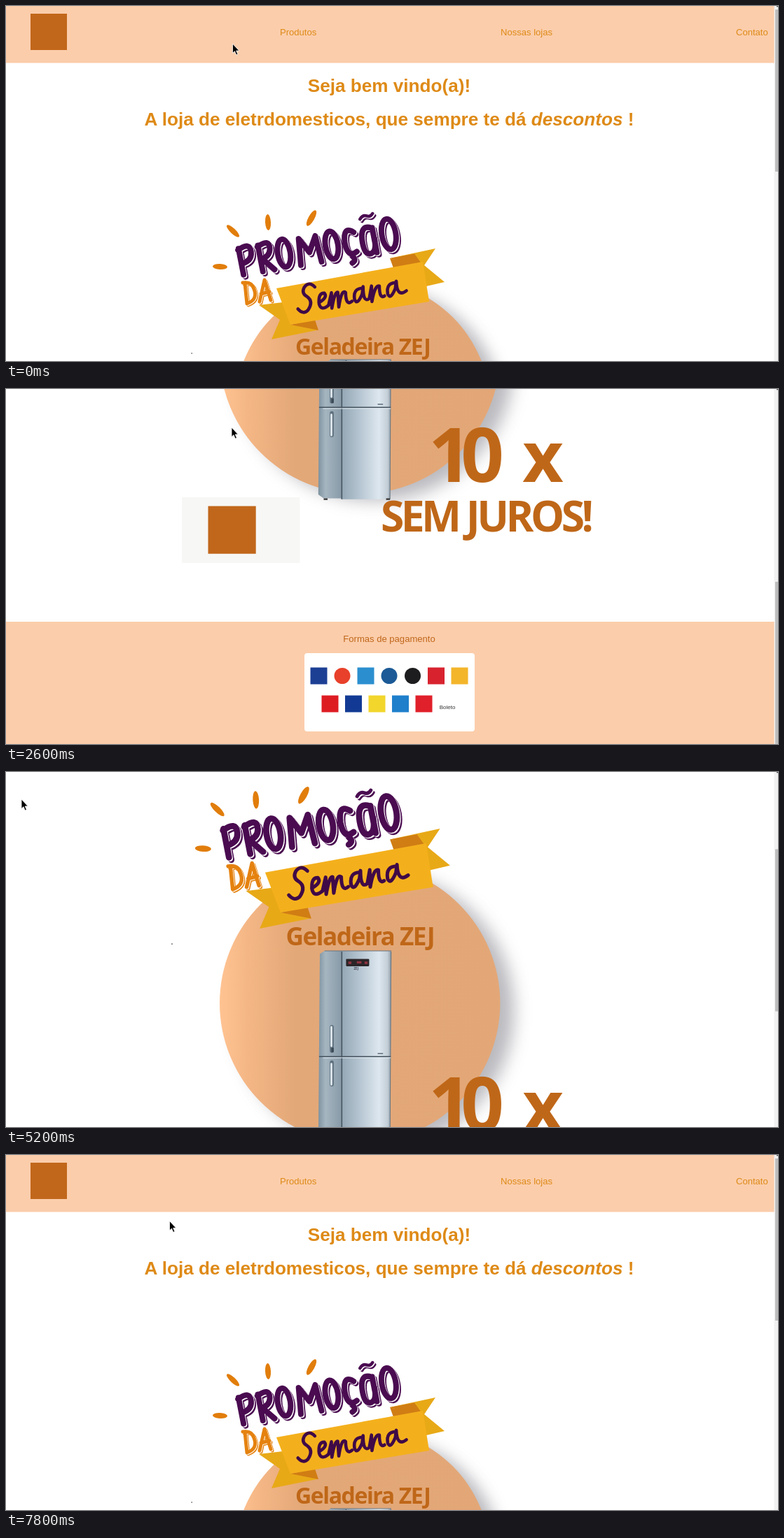
Animation of 1102 by 508 pixels, one loop 8 s. Source, as an HTML page:

```html
<!DOCTYPE html>
<html lang="pt-BR">
<head>
<meta charset="utf-8">
<title>Loja de eletrodomésticos</title>
<style>
  html, body { margin: 0; width: 100%; height: 100%; overflow: hidden; background: #fff; }
  svg { display: block; width: 1102px; height: 508px; }
  text { font-family: "Liberation Sans", Arial, sans-serif; font-size: 13.07px; }
  .nav { fill: #de8a17; }
  .title { fill: #de8a17; font-size: 26.14px; font-weight: bold; text-anchor: middle; }
  .offer text { font-family: "Noto Sans", "Open Sans", sans-serif; font-weight: 700; fill: #bf6718; }
  .ink { fill: none; stroke-linecap: round; stroke-linejoin: round; }
</style>
</head>
<body>
<svg viewBox="0 0 1102 508">
  <defs>
    <linearGradient id="disc">
      <stop offset="0" stop-color="#ffc392"/>
      <stop offset=".1" stop-color="#f4b685"/>
      <stop offset=".27" stop-color="#e3a878"/>
      <stop offset="1" stop-color="#e3a777"/>
    </linearGradient>
    <linearGradient id="side">
      <stop offset="0" stop-color="#7e929f"/>
      <stop offset=".3" stop-color="#a5b6c1"/>
      <stop offset="1" stop-color="#8799a6"/>
    </linearGradient>
    <linearGradient id="door">
      <stop offset="0" stop-color="#93a6b4"/>
      <stop offset=".35" stop-color="#b4c4d0"/>
      <stop offset=".75" stop-color="#dde7ef"/>
      <stop offset=".92" stop-color="#c3ced7"/>
      <stop offset="1" stop-color="#8996a1"/>
    </linearGradient>
    <filter id="blur" x="-20%" y="-20%" width="140%" height="140%"><feGaussianBlur stdDeviation="11"/></filter>

    <g id="promo" class="ink">
      <path d="M14-42L15-4M13-40Q32-50 31-34Q30-22 16-20"/>
      <path d="M42-42L43-4M41-40Q60-50 58-34Q56-24 45-22L60-4"/>
      <path d="M68-25a9 20 0 1 1 18 0a9 20 0 1 1-18 0M137-25a9 20 0 1 1 18 0a9 20 0 1 1-18 0M219-27a10 22 0 1 1 20 0a10 22 0 1 1-20 0"/>
      <path d="M98-4L101-42L113-20L125-42L128-4"/>
      <path d="M180-38Q166-50 165-25Q166-2 180-10M173-4q5 6-2 9"/>
      <path d="M206-40q-16-8-16 18q0 20 10 18q8-2 8-20M207-40L208-4"/>
      <path d="M192-55q5-6 10-3t9-2" stroke-width="4.5"/>
    </g>
    <path id="da" class="ink" d="M341 397L344 426Q360 420 354 405Q351 394 338 396M362 423L369 392L378 421M364 412L376 409"/>
  </defs>

  <g id="page">
    <rect width="1097" height="81.5" fill="#fbcdab"/>
    <rect x="35" y="11" width="52" height="52" fill="#c1671b"/>
    <g class="nav">
      <text x="391" y="41.5">Produtos</text>
      <text x="706" y="41.5">Nossas lojas</text>
      <text x="1042" y="41.5">Contato</text>
    </g>
    <text class="title" x="547" y="123">Seja bem vindo(a)!</text>
    <text class="title" x="547" y="170.5">A loja de eletrdomesticos, que sempre te dá <tspan font-style="italic">descontos</tspan> !</text>

    <g id="offer" class="offer">
      <rect x="264.5" y="496" width="1.3" height="2" fill="#777"/>
      <circle cx="528" cy="584" r="181" fill="#74747f" opacity=".5" filter="url(#blur)"/>
      <circle cx="509" cy="574" r="182" fill="url(#disc)"/>

      <path d="M457 510L463 506H486V762H462L455 757Z" fill="url(#side)"/>
      <path d="M485 506H549L550 508L548 763H485Z" fill="url(#door)"/>
      <path d="M463 506H550M549.3 507L548 763" stroke="#697782" fill="none"/>
      <path d="M485.5 507V763M456 643.5H549" stroke="#45535f" stroke-width="1.4"/>
      <path d="M461 645.2H549" stroke="#dfe8ee"/>
      <path d="M462 763H467M543 763H548" stroke="#333" stroke-width="2"/>
      <rect x="491" y="516.5" width="30" height="9.5" rx="1" fill="#2b2528"/>
      <path d="M494 521.5H498M505 521H511M515 521.5H519" stroke="#8f3340" stroke-width="3"/>
      <text x="501" y="531" style="font-size:4px;fill:#445">ZEJ</text>
      <path d="M532 639.5H539" stroke="#667682" stroke-width="1.5"/>
      <path d="M472.5 605V636M472.5 651V680" stroke="#5e707d" stroke-width="5" stroke-linecap="round"/>
      <path d="M472 605V630M472 653V680" stroke="#e4edf3" stroke-width="2.4" stroke-linecap="round"/>
      <rect x="472" y="632" width="3" height="6" fill="#3b4a55"/>

      <text x="413" y="498.5" style="font-size:32px;letter-spacing:-1.4px">Geladeira ZEJ</text>
      <g style="font-size:98px">
        <text x="598" y="741" style="font-size:98px;letter-spacing:-14px">10</text>
        <text x="746.5" y="741" text-anchor="middle" style="font-size:92px">x</text>
      </g>
      <text x="536" y="805" style="font-size:55px;letter-spacing:-4.1px">SEM JUROS!</text>

      <rect x="278" y="760.5" width="153" height="85.5" fill="#f7f7f5"/>
      <rect x="312" y="772" width="62" height="62" fill="#c1671b"/>

      <g fill="#e17d0b">
        <ellipse cx="305.5" cy="373" rx="10.5" ry="4" transform="rotate(3 305.5 373)"/>
        <ellipse cx="324" cy="322" rx="12" ry="3.8" transform="rotate(44 324 322)"/>
        <ellipse cx="374" cy="309.5" rx="4" ry="11.5" transform="rotate(-3 374 309.5)"/>
        <ellipse cx="436" cy="303.5" rx="4.3" ry="12.5" transform="rotate(29 436 303.5)"/>
      </g>

      <g id="lettering"></g>

      <path d="M361 428L395 424L408 456L446 463.5L379 477L391 449Z" fill="#e8a917"/>
      <path d="M548 361L613 347L597 371L626 395L600 401L590 366Z" fill="#e8a917"/>
      <path d="M406 456L441 449L446 464Z M548 361L553 375L584 369Z" fill="#d07d14"/>
      <path d="M548 361L583 354.5L592 367L580 370Z" fill="#d07d14"/>
      <path d="M386 404L595 366L604 423L406 456Z" fill="#f4b01c"/>
      <g class="ink" transform="translate(420 441) rotate(-9.5)" stroke="#3f0a47" stroke-width="4.6">
        <path d="M27-35Q20-45 12-37Q6-29 14-23Q22-15 12-4Q4 2-2-8"/>
        <path d="M29-12Q43-17 39-24Q30-26 29-10Q30 1 42-6L49-23L46-1Q54-24 58-22L56-1Q64-26 69-20Q66 0 76-6"/>
        <path d="M94-22Q80-24 80-8Q82 2 92-14L95-24Q91 0 101-6L107-23L104-1Q112-24 118-21Q115-2 123-6"/>
        <path d="M142-22Q128-24 128-8Q130 2 140-14L143-24Q140 0 155-8"/>
      </g>
    </g>

    <rect y="957" width="1097" height="175" fill="#fbcdab"/>
    <text x="547" y="985.5" text-anchor="middle" fill="#c0671b">Formas de pagamento</text>
    <rect x="426" y="1002" width="243" height="112" rx="4" fill="#fff"/>
    <g id="payments"></g>
    <text x="630" y="1082" text-anchor="middle" style="font-size:8px;fill:#333">Boleto</text>
  </g>

  <rect x="1096.5" width="6" height="508" fill="#f1f1f1"/>
  <rect x="1100" width="2" height="1.3" fill="#555"/>
  <rect id="thumb" x="1098" width="4" height="232" fill="#bdbdbd"/>
  <path id="cursor" d="M0 0V13.5L3 10.7L5.2 16L7.4 15L5.2 10H9.3Z" fill="#000" stroke="#fff" stroke-width=".8"/>
</svg>

<script>
const $ = id => document.getElementById(id);
const LOOP = 8000;

// Each entry holds from its time until the next one.
const scrollTrack = [
  [0, 0], [500, 20], [600, 70], [700, 128], [800, 170], [900, 205], [1000, 230],
  [1100, 247], [1200, 257], [1300, 263], [2600, 624], [2900, 605], [3000, 570],
  [3200, 500], [3400, 446], [3600, 425], [3800, 243], [7200, 138], [7600, 0]
];
const hoverTrack = [[0, 0], [2600, 1], [5500, 0], [5700, 1], [6200, 0], [6500, 1], [7600, 0]];
const cursorTrack = [
  [0, 323.5, 54], [2600, 322, 55], [3600, 318, 64], [3800, 316, 72], [4000, 372, 110],
  [4100, 390, 127], [4200, 291, 119], [4400, 190, 115], [4500, 112, 121], [4700, 95, 122],
  [4900, 70, 105], [5000, 48, 86], [5200, 22, 39], [5500, 116, 30], [5700, 279, 145],
  [6000, 152, 60], [6200, 91.5, 37], [6500, 287, 154], [6800, 349, 182], [7200, 314, 166],
  [7800, 233.5, 94.5]
];
const at = (track, t) => track.findLast(key => key[0] <= t).slice(1);

// Lettering with a white gap and an offset shadow.
function layered(id, transform, color, width, shift) {
  const layers = [[shift, color, width], [shift * .4, "#fff", width], [0, color, width]];
  return layers.map(([d, stroke, w]) =>
    `<g transform="translate(${d} ${d})"><use href="#${id}" transform="${transform}" stroke="${stroke}" stroke-width="${w}"/></g>`
  ).join("");
}
$("lettering").innerHTML =
  layered("promo", "translate(325 391) rotate(-9.5)", "#4a0b50", 8, 3) +
  layered("da", "", "#e5820f", 5, 2);

const badge = (x, y, color, round) => round
  ? `<circle cx="${x}" cy="${y}" r="11.5" fill="${color}"/>`
  : `<rect x="${x - 12}" y="${y - 12}" width="24" height="24" fill="${color}"/>`;
const badgeRow = (x0, y, items) => items.map(([color, round], i) => badge(x0 + i * 33.5, y, color, round)).join("");
$("payments").innerHTML =
  badgeRow(446.5, 1034.5, [["#1c3f94"], ["#e8402a", 1], ["#2b8fcf"], ["#1b5a96", 1], ["#1d1d1f", 1], ["#d8232f"], ["#f3b52a"]]) +
  badgeRow(462.5, 1074.5, [["#dd1c22"], ["#123a94"], ["#f2d62c"], ["#1f7fcb"], ["#e0202a"]]);

function render(t) {
  const [scroll] = at(scrollTrack, t);
  const [hover] = at(hoverTrack, t);
  const [x, y] = at(cursorTrack, t);
  $("page").setAttribute("transform", `translate(0 ${-scroll})`);
  $("offer").setAttribute("transform", `translate(547 576.5) scale(${hover ? 1.1 : 1}) translate(-547 -576.5)`);
  $("thumb").setAttribute("y", 5 + scroll * .434);
  $("cursor").setAttribute("transform", `translate(${x} ${y})`);
}

const start = performance.now();
function tick() {
  render((performance.now() - start) % LOOP);
  requestAnimationFrame(tick);
}
tick();
</script>
</body>
</html>
```
